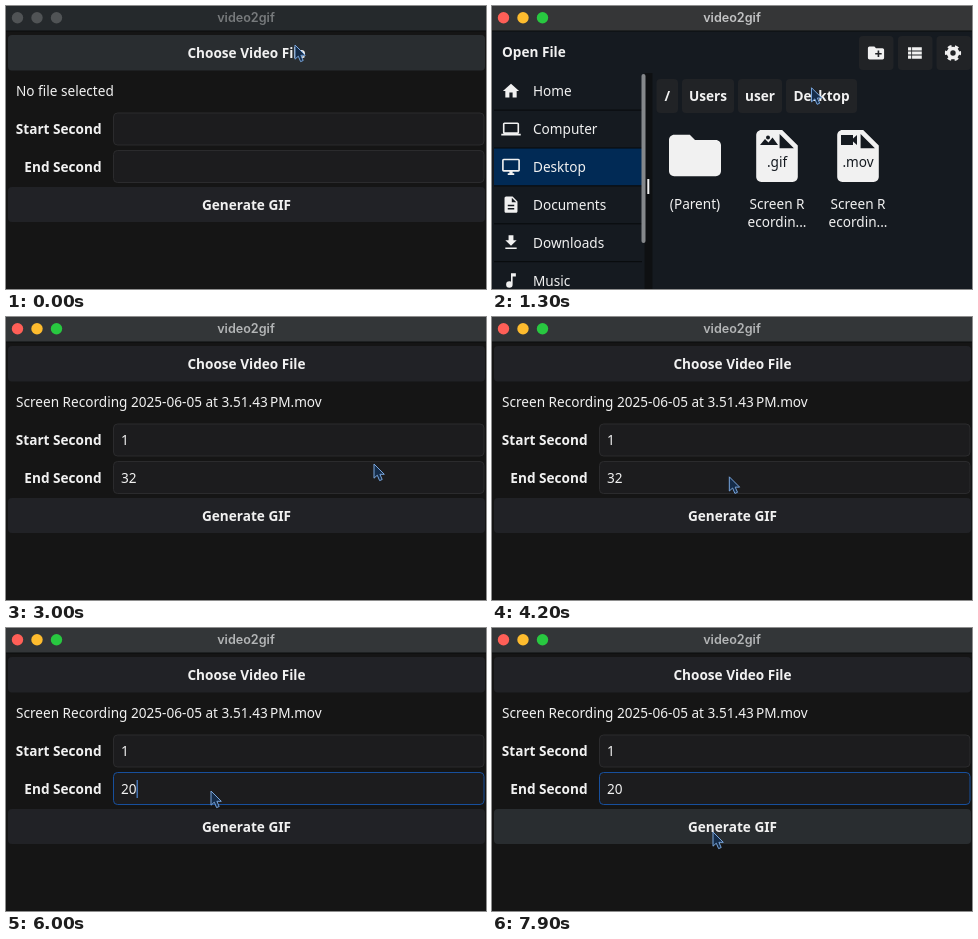
Write an HTML page that moves like this. It is 480 by 283 pixels and loops after 8000 ms.

```html
<!DOCTYPE html>
<html lang="en">
<head>
<meta charset="utf-8">
<title>video2gif</title>
<style>
  html, body { margin: 0; width: 100%; height: 100%; overflow: hidden; background: #151515; }
  svg { display: block; width: 100vw; height: 100vh; }
  text { font: 13.6px "Noto Sans", sans-serif; fill: #f1f1f1; white-space: pre; }
  .bold { font-weight: 700; }
  .mid { text-anchor: middle; }
  .end { text-anchor: end; }
  .title { font: 600 12.6px Inter, sans-serif; }
  .icon { fill: #f1f1f1; }
  .dark { fill: #151a20; }
</style>
</head>
<body>
<svg id="stage" viewBox="0 0 480 283" preserveAspectRatio="none"></svg>
<script>
const LOOP = 8000, STEP = 100;
const ACTIVATE = 100, OPEN = 200, CLOSE = 2900, FOCUS = 4500;
const TYPING = [[0, '32'], [5500, '3'], [5600, ''], [5900, '2'], [6000, '20']];
const POINTER = [
  [0, 289, 39], [400, 288, 40], [1000, 288, 40], [1700, 368, 146], [2300, 368, 147],
  [3700, 368, 147], [4400, 205, 163], [6500, 205, 163], [6800, 212, 181],
  [7000, 219, 200], [7300, 221, 204], [8000, 221, 204]
];

const ICONS = {
  home: 'M10 20v-6h4v6h5v-8h3L12 3 2 12h3v8z',
  computer: 'M20 18c1.1 0 2-.9 2-2V6c0-1.1-.9-2-2-2H4c-1.1 0-2 .9-2 2v10c0 1.1.9 2 2 2H0v2h24v-2zM4 6h16v10H4z',
  desktop: 'M21 2H3c-1.1 0-2 .9-2 2v12c0 1.1.9 2 2 2h7v2H8v2h8v-2h-2v-2h7c1.1 0 2-.9 2-2V4c0-1.1-.9-2-2-2zm0 14H3V4h18z',
  documents: 'M14 2H6c-1.1 0-2 .9-2 2v16c0 1.1.9 2 2 2h12c1.1 0 2-.9 2-2V8zm2 16H8v-2h8zm0-4H8v-2h8zm-3-5V3.5L18.5 9z',
  downloads: 'M19 9h-4V3H9v6H5l7 7zM5 18v2h14v-2z',
  music: 'M12 3v10.55c-.6-.34-1.27-.55-2-.55a4 4 0 1 0 4 4V7h4V3z',
  folder: 'M10 4H4c-1.1 0-2 .9-2 2v12c0 1.1.9 2 2 2h16c1.1 0 2-.9 2-2V8c0-1.1-.9-2-2-2h-8z',
  newFolder: 'M20 6h-8l-2-2H4c-1.1 0-2 .9-2 2v12c0 1.1.9 2 2 2h16c1.1 0 2-.9 2-2V8c0-1.1-.9-2-2-2zm-1 8h-3v3h-2v-3h-3v-2h3V9h2v3h3z',
  list: 'M4 14h4v-4H4zm0 5h4v-4H4zM4 9h4V5H4zm5 5h12v-4H9zm0 5h12v-4H9zM9 5v4h12V5z',
  file: 'M14 2H6c-1.1 0-2 .9-2 2v16c0 1.1.9 2 2 2h12c1.1 0 2-.9 2-2V8zM13 9V3.5L18.5 9z'
};

const rect = (x, y, w, h, fill, extra = '') =>
  `<rect x="${x}" y="${y}" width="${w}" height="${h}" fill="${fill}" ${extra}/>`;
const text = (x, y, label, cls = '', id = '') =>
  `<text x="${x}" y="${y}" class="${cls}" ${id && `id="${id}"`}>${label}</text>`;
const icon = (name, x, y, scale = .81) =>
  `<path class="icon" fill-rule="evenodd" d="${ICONS[name]}" transform="translate(${x} ${y}) scale(${scale}) translate(-12 -12)"/>`;
const button = (x, y, w, h, label, id = '') =>
  rect(x, y, w, h, '#212326', `rx="4" ${id && `id="${id}"`}`) + text(x + w / 2, y + h / 2 + 5, label, 'bold mid');
const entry = (y, id) =>
  rect(107.5, y, 370.5, 32, '#1c1c1e', `rx="4" stroke="#2b2b2d" id="${id}"`);

function titleBar() {
  const lights = [11.5, 31, 50.5].map(x => `<circle class="light" cx="${x}" cy="11.7" r="5.7"/>`).join('');
  return rect(0, 0, 480, 25, '#333638', 'id="bar"') + rect(0, 24.5, 480, 1, '#0b0c0d')
    + lights + text(240, 16, 'video2gif', 'title mid', 'title');
}

function form() {
  return rect(0, 25, 480, 258, '#151515')
    + button(2, 29, 477, 35.5, 'Choose Video File', 'choose')
    + text(10, 90, '', '', 'fileName')
    + text(95.5, 128, 'Start Second', 'bold end') + entry(107, 'startBox') + text(115, 128, '', '', 'start')
    + text(95.5, 166, 'End Second', 'bold end') + entry(144.5, 'endBox') + text(115, 166, '', '', 'finish')
    + rect(130, 152, 1.3, 18, '#4b80c8', 'id="caret"')
    + button(2, 181, 477, 35, 'Generate GIF', 'generate');
}

function sidebar() {
  const places = ['Home', 'Computer', 'Desktop', 'Documents', 'Downloads', 'Music'];
  return rect(2, 142, 148, 37.5, '#012a55') + places.map((place, i) => {
    const y = 85 + i * 37.9;
    return icon(place.toLowerCase(), 19, y) + text(41, y + 5, place)
      + (i < 5 ? rect(2, y + 18.6, 148, 1, '#07090b') : '');
  }).join('')
    + rect(152.5, 67, 8, 216, '#0e1012') + rect(149.5, 68, 4, 169, '#85888b', 'rx="2"')
    + rect(155.3, 173, 2, 15, '#f1f1f1');
}

function fileItem(x, ext, glyph) {
  return icon('file', x, 150, 2.6)
    + `<g class="dark" transform="translate(${x} 134)">${glyph}</g>`
    + text(x, 161, ext, 'mid dark')
    + text(x, 203, 'Screen R', 'mid') + text(x, 221, 'ecordin...', 'mid');
}

function dialog() {
  const picture = '<circle cx="-9" cy="-2.5" r="2"/><path d="M-17 5l5-6 3.5 3.5 4-5L1 5z"/>';
  const camera = '<path d="M-17-5H-5v3.5l4-3.5V5l-4-3.5V5H-17z"/>';
  const gear = '<g fill="none" stroke="#f1f1f1" transform="translate(461 47)">'
    + '<circle r="4.5" stroke-width="3.6"/>'
    + '<circle r="6.8" stroke-width="2.6" stroke-dasharray="3.8 3.32" stroke-dashoffset="1.9"/></g>';
  const tool = x => rect(x, 30, 34.5, 34, '#212326', 'rx="4"');
  return rect(0, 25, 480, 258, '#151a20')
    + text(10, 51, 'Open File', 'bold')
    + tool(367) + tool(406) + tool(444.5)
    + icon('newFolder', 384, 47) + icon('list', 422.5, 47) + gear
    + sidebar()
    + button(164.5, 73, 21.5, 34, '/') + button(190, 73, 52, 34, 'Users')
    + button(246, 73, 44, 34, 'user') + button(294, 73, 71, 34, 'Desktop')
    + rect(327, 118, 78, 115, '#20252b', 'rx="4" id="itemHover"')
    + icon('folder', 203, 149.5, 2.6) + text(203, 203, '(Parent)', 'mid')
    + fileItem(285, '.gif', picture) + fileItem(366, '.mov', camera);
}

const stage = document.getElementById('stage');
stage.innerHTML = form() + `<g id="dialog">${dialog()}</g>` + titleBar()
  + '<path id="pointer" d="M0 0V14.2L3.3 11.2 5.6 16.6 8.2 15.5 5.9 10.3H10.3Z" fill="#152c49" stroke="#78a5dc" stroke-linejoin="round"/>';

const $ = id => document.getElementById(id);
const show = (id, on) => $(id).setAttribute('visibility', on ? 'visible' : 'hidden');
const fill = (id, color) => $(id).setAttribute('fill', color);
const lights = [...document.querySelectorAll('.light')];
const lightColors = ['#ff5f57', '#febc2e', '#28c840'];

function pointerAt(t) {
  const i = POINTER.findIndex(p => p[0] > t);
  const [t0, x0, y0] = POINTER[i - 1], [t1, x1, y1] = POINTER[i];
  const u = (t - t0) / (t1 - t0);
  const k = t1 - t0 > 500 ? u * u * (3 - 2 * u) : u;
  return [x0 + (x1 - x0) * k, y0 + (y1 - y0) * k];
}

function draw(t) {
  const [x, y] = pointerAt(t);
  const active = t >= ACTIVATE, open = t >= OPEN && t < CLOSE;
  const loaded = t >= CLOSE, focused = t >= FOCUS;
  const over = (x0, y0, x1, y1) => x >= x0 && x <= x1 && y > y0 && y < y1;

  $('pointer').setAttribute('transform', `translate(${x} ${y})`);
  fill('bar', !active ? '#25292c' : open ? '#353637' : '#333638');
  $('title').style.fill = !active ? '#777a7c' : open ? '#c2c3c4' : '#b3b5b6';
  lights.forEach((el, i) => el.setAttribute('fill', active ? lightColors[i] : '#505355'));

  show('dialog', open);
  show('itemHover', open && over(327, 118, 405, 233));
  fill('choose', over(2, 29, 479, 64) ? '#292d30' : '#212226');
  fill('generate', over(2, 182, 479, 216) ? '#292d30' : '#212226');

  $('fileName').textContent = loaded ? 'Screen Recording 2025-06-05 at 3.51.43\u202fPM.mov' : 'No file selected';
  $('start').textContent = loaded ? '1' : '';
  const value = TYPING.filter(([at]) => at <= t).pop()[1];
  $('finish').textContent = loaded ? value : '';

  $('endBox').setAttribute('stroke', focused ? '#174f9c' : '#2b2b2d');
  const phase = t % 1000, typing = t >= 5500 && t < 6300;
  show('caret', focused && (typing || phase >= 350 && phase < 850));
  $('caret').setAttribute('x', 115 + value.length * 7.78);
}

function tick() {
  draw(Math.floor(performance.now() % LOOP / STEP) * STEP);
  requestAnimationFrame(tick);
}
tick();
</script>
</body>
</html>
```
